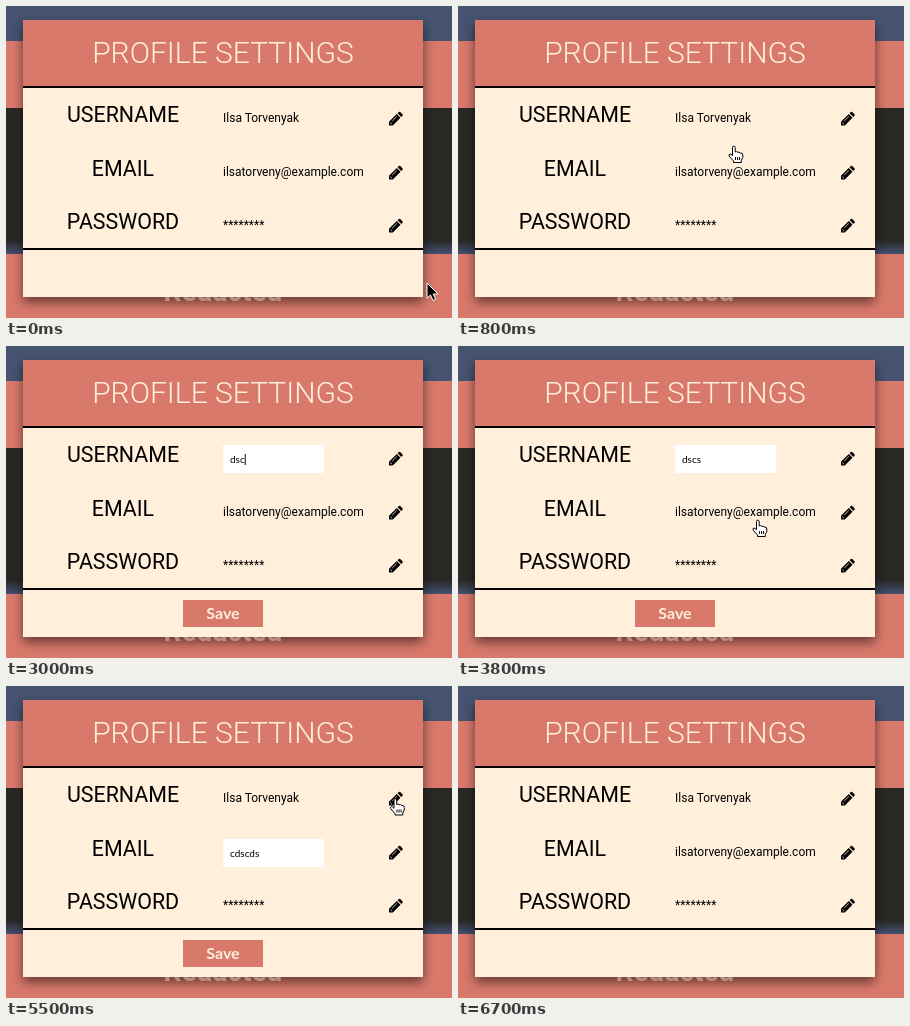
Recreate the animation shown at these times as an HTML page. Size 446x312 px, loop 6.8 s.

```html
<!DOCTYPE html>
<html lang="en">
<head>
<meta charset="utf-8">
<title>Profile settings</title>
<style>
  html, body { margin: 0; width: 100%; height: 100%; overflow: hidden; }
  svg { display: block; width: 100%; height: 100%; font: 12px Roboto, sans-serif; }
  .card { filter: drop-shadow(0 5px 6px rgba(0, 0, 0, .55)); }
  .title { font-size: 30px; font-weight: 300; fill: #ffefdb; }
  .label { font-size: 21.4px; }
  .title, .label, .save, .ghost { text-anchor: middle; }
  .input { font: 10px Lato, sans-serif; }
  .save { font: bold 16px Lato, sans-serif; fill: #ffefdb; }
  .ghost { font-size: 28px; font-weight: 700; fill: #ffefdb; opacity: .4; }
</style>
</head>
<body>
<svg viewBox="0 0 446 312">
  <defs>
    <linearGradient id="dusk" x2="0" y2="1">
      <stop stop-color="#2a2825"/><stop offset="1" stop-color="#435170"/>
    </linearGradient>
    <g id="pencil">
      <path d="M0 14V10.2L7.8 2.5 11.5 6.2 3.8 14ZM8.6 1.7 9.8.5Q10.5 0 11.2.5L13.5 2.8Q14 3.5 13.5 4.2L12.3 5.4Z"/>
      <path d="M1.3 11 3 12.7M3.2 9.6 7.8 5" stroke="#ffefdb" stroke-width=".8"/>
    </g>
  </defs>

  <rect width="446" height="312" fill="#d9796c"/>
  <rect width="446" height="35" fill="#465470"/>
  <rect y="102" width="446" height="133" fill="#2a2825"/>
  <rect y="234" width="446" height="14" fill="url(#dusk)"/>

  <rect class="card" x="17" y="14" width="400" height="277" fill="#ffefdb"/>
  <text class="ghost" x="217" y="295">Redacted</text>
  <rect x="17" y="14" width="400" height="277" fill="#ffefdb"/>
  <rect x="17" y="14" width="400" height="66" fill="#d9796c"/>
  <path d="M17 81H417M17 243H417" stroke="#000" stroke-width="2"/>
  <text class="title" x="217" y="57">PROFILE SETTINGS</text>
  <g id="rows"></g>
  <g id="save">
    <rect x="177" y="254" width="80" height="27" fill="#d9796c"/>
    <text class="save" x="217" y="273">Save</text>
  </g>

  <g id="cursor" stroke-linejoin="round">
    <path id="arrow" d="M0 0V15.2L3.5 12 6 17.5 8.6 16.4 6.2 11H11Z" stroke="#fff"/>
    <path id="hand" fill="#fff" stroke="#000" d="M-1.5 9V1.5Q-1.5 .2-.2 .2T1.2 1.5V6Q2.5 5 3.7 6.3 5 5.5 6.2 7 8.8 6.5 8.8 9V11.5L7.3 14.5V16.5H-.5V15L-4.8 10.2Q-5.5 8.3-4 8-3 8-1.5 9.8ZM1.5 11V14M3.6 11V14M5.6 11V14"/>
    <path id="beam" fill="none" stroke="#000" d="M-3-6.5Q0-6.5 0-4.5 0-6.5 3-6.5M0-5V5M-3 6.5Q0 6.5 0 4.5 0 6.5 3 6.5M-1.5 2H1.5"/>
  </g>
</svg>
<script>
const LOOP = 6800, STEP = 100;
const $ = id => document.getElementById(id);

const rows = [
  { label: 'USERNAME', value: 'Ilsa Torvenyak', y: 116, hint: 'Username', open: 1200, close: 5300,
    keys: 'dscs', times: [2700, 2800, 3000, 3200], caret: [[2100, 2600], [2700, 3400]] },
  { label: 'EMAIL', value: 'ilsatorveny@example.com', y: 170, hint: 'Email', open: 3900, close: 6200,
    keys: 'cdscds', times: [4300, 4500, 4800, 4850, 4900, 5000], caret: [[4100, 5300]] },
  { label: 'PASSWORD', value: '********', y: 223 }
];

// time, x, y, shape shown from that time on
const path = [
  [0, 421, 277, 'arrow'], [600, 283, 146, 'hand'], [700, 276, 140, 'hand'], [900, 276, 140, 'hand'],
  [1200, 266, 112, 'beam'], [1500, 264, 107, 'beam'], [2700, 264, 107, ''],
  [3400, 275, 125, 'beam'], [3700, 300, 174, 'hand'], [3900, 300, 174, 'beam'], [4300, 296, 168, ''],
  [5000, 360, 145, 'arrow'], [5100, 389.5, 112.5, 'hand'], [5500, 389.5, 112.5, 'hand'],
  [5800, 389.5, 171, 'hand'], [6200, 389.5, 171, 'arrow'], [6600, 425, 313, ''], [LOOP, 425, 313, '']
];

$('rows').innerHTML = rows.map(({ label, value, y }) => `
  <text class="label" x="117" y="${y}">${label}</text>
  <text class="value" x="217" y="${y}">${value}</text>
  <g class="field">
    <rect x="217" y="${y - 17}" width="101" height="28" fill="#fff"/>
    <text class="input" x="224" y="${y + 1}"></text>
    <path class="caret" stroke="#000"/>
  </g>
  <use href="#pencil" x="383" y="${y - 10.5}"/>`).join('');

const all = name => [...document.querySelectorAll('.' + name)];
const values = all('value'), fields = all('field'), inputs = all('input'), carets = all('caret');
const clamp = v => Math.max(0, Math.min(1, v));
const within = (t, [a, b]) => t >= a && t < b;
const show = (el, on) => el.setAttribute('display', on ? 'inline' : 'none');

function drawRow(row, i, t) {
  const editing = within(t, [row.open, row.close]);
  show(values[i], !editing);
  show(fields[i], editing);
  if (!editing) return;
  const typed = row.keys.slice(0, row.times.filter(k => k <= t).length);
  inputs[i].textContent = typed || row.hint;
  inputs[i].setAttribute('fill', typed ? '#000' : '#999');
  const x = 224.5 + (typed ? inputs[i].getComputedTextLength() : 0);
  carets[i].setAttribute('d', `M${x} ${row.y - 8}v11`);
  show(carets[i], row.caret.some(span => within(t, span)));
}

function drawCursor(t) {
  const i = path.findIndex(p => p[0] > t) - 1;
  const [t0, x0, y0, shape] = path[i], [t1, x1, y1] = path[i + 1];
  const p = (t - t0) / (t1 - t0), e = p * p * (3 - 2 * p);
  $('cursor').setAttribute('transform', `translate(${x0 + (x1 - x0) * e} ${y0 + (y1 - y0) * e})`);
  for (const id of ['arrow', 'hand', 'beam']) show($(id), id === shape);
}

function frame(now) {
  const t = Math.floor(now % LOOP / STEP) * STEP;
  rows.forEach((row, i) => drawRow(row, i, t));
  $('save').setAttribute('opacity', t < 6200 ? clamp((t - 1100) / 400) : 0);
  drawCursor(t);
}

let start;
function tick(now) {
  start ??= now;
  frame(now - start);
  requestAnimationFrame(tick);
}
frame(0);
requestAnimationFrame(tick);
</script>
</body>
</html>
```
